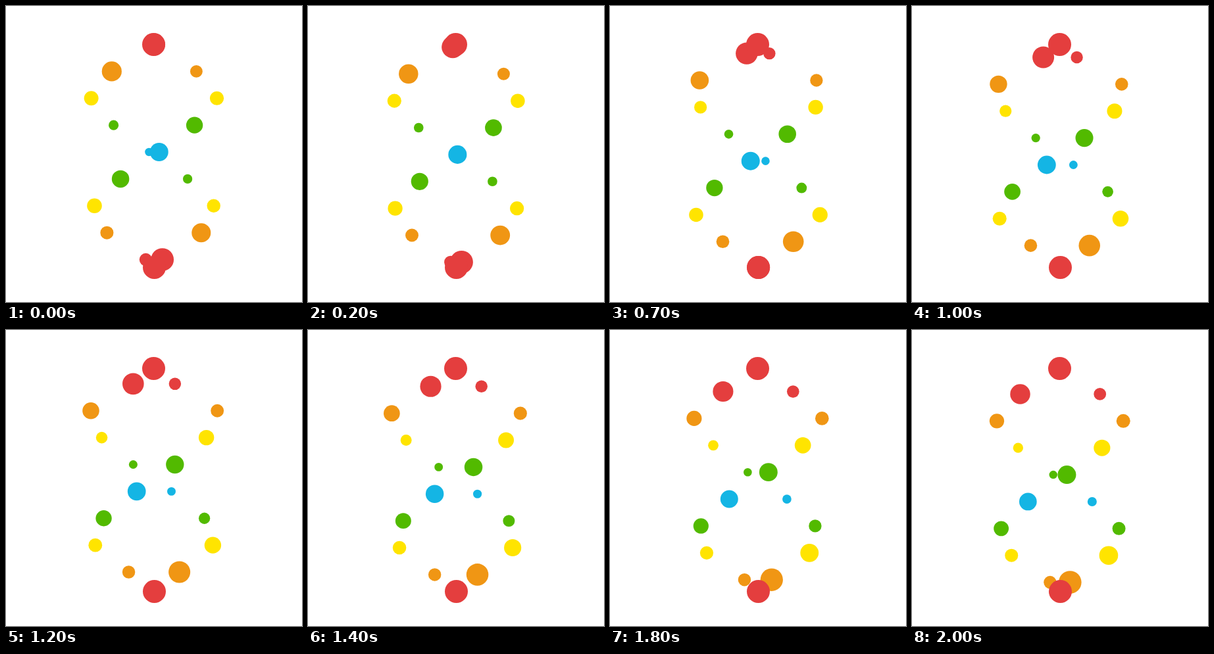
An HTML page that plays this animation: 450 by 450 pixels, repeating every 2100 ms.

```html
<!DOCTYPE html>
<html lang="en">
<head>
<meta charset="utf-8">
<title>Helix</title>
<style>
  html, body { margin: 0; width: 100%; height: 100%; overflow: hidden; background: #fff; }
  svg { display: block; width: 100%; height: 100%; }
</style>
</head>
<body>
<svg id="stage" viewBox="0 0 450 450"></svg>
<script>
const STEP_MS = 100, STEPS = 21;
const CENTER = 225.1, TOP = 58.5, GAP = 40.88, BOTTOM = 397.5;
const TURN = 8.25; // rows per full twist
const END = 8.35;  // row position where balls vanish into the bottom ball
const RED = '#e43e3e', ORANGE = '#f09614', YELLOW = '#ffe400', GREEN = '#52ba00', BLUE = '#14b5e4';
const COLORS = [RED, ORANGE, YELLOW, GREEN, BLUE, GREEN, YELLOW, ORANGE, RED];

// Key points of the swing: [row position, offset from the centre].
const SWING = [
  [0, 0], [0.5, 27], [1, 64.3], [1.25, 84.5], [1.5, 94.3], [1.75, 98], [2.25, 90], [3, 61.5],
  [4.25, -6.5], [5, -51], [6.2, -94], [7, -71.7], [8, -12.6], [END, 0]
];

// Smooth curve (cubic Hermite) through the key points.
function swing(u) {
  const last = SWING.length - 1;
  const next = SWING.findIndex(([key]) => key > u);
  const k = (next < 0 ? last : next) - 1;
  const slope = j => {
    const [u0, x0] = SWING[Math.max(0, j - 1)], [u1, x1] = SWING[Math.min(last, j + 1)];
    return (x1 - x0) / (u1 - u0);
  };
  const [[u0, x0], [u1, x1]] = SWING.slice(k, k + 2);
  const span = u1 - u0, t = Math.min(1, (u - u0) / span), s = 1 - t;
  return x0 * (1 + 2 * t) * s * s + x1 * (3 - 2 * t) * t * t
    + span * t * s * (slope(k) * s - slope(k + 1) * t);
}

// Nearer balls are larger; side is 1 for the strand that starts in front.
function radius(u, side) {
  const angle = 2 * Math.PI * u / TURN;
  return 11 + 0.07 * u + (1.6 + 3.9 * side) * Math.cos(angle) + 0.45 * Math.cos(2 * angle);
}

const stage = document.getElementById('stage');

function addBall(fill) {
  const ball = document.createElementNS('http://www.w3.org/2000/svg', 'circle');
  ball.setAttribute('fill', fill);
  return stage.appendChild(ball);
}

function place(ball, x, y, r) {
  ball.setAttribute('cx', x.toFixed(2));
  ball.setAttribute('cy', y.toFixed(2));
  ball.setAttribute('r', r.toFixed(2));
}

const balls = COLORS.flatMap((color, row) =>
  [1, -1].map(side => ({ row, side, node: addBall(color) })));
place(addBall(RED), 224.5, TOP, 17.5);
place(addBall(RED), 225.5, BOTTOM, 17.5);

function draw(ms) {
  const phase = Math.floor(ms / STEP_MS) % STEPS / STEPS;
  for (const { row, side, node } of balls) {
    const u = row + phase;
    const y = Math.min(BOTTOM, TOP + GAP * u);
    place(node, CENTER - side * swing(u), y, u < END ? radius(u, side) : 0);
  }
}

const start = performance.now();
function tick() {
  draw(performance.now() - start);
  requestAnimationFrame(tick);
}
tick();
</script>
</body>
</html>
```
